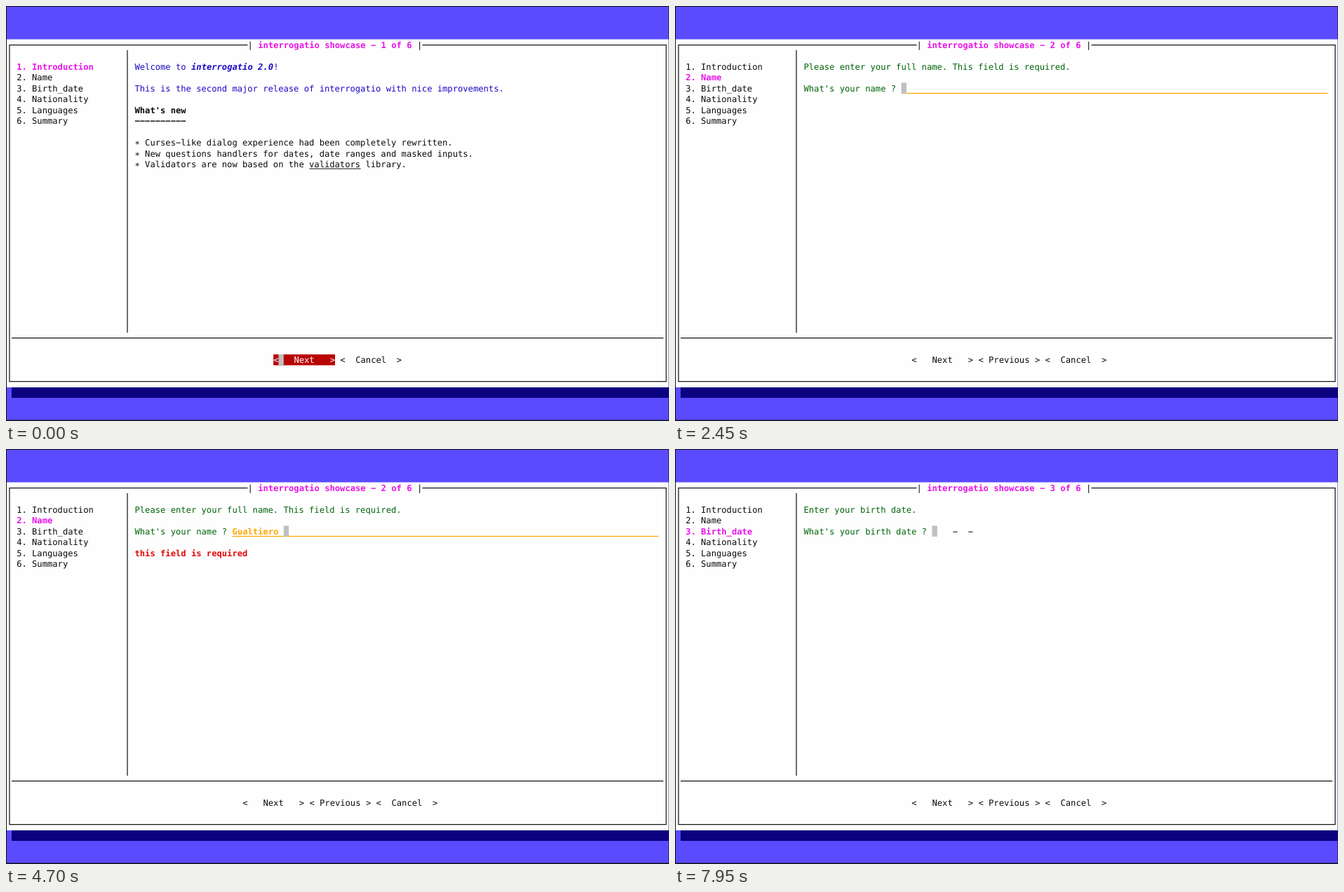
These frames come from a looping animation (945x592 px, 8000 ms). An HTML page:

```html
<!DOCTYPE html>
<html lang="en">
<head>
<meta charset="utf-8">
<title>Terminal dialog</title>
<style>
  html, body { margin: 0; width: 100%; height: 100%; overflow: hidden; background: #111; }
  svg { display: block; width: 100%; height: 100%; }
  text {
    font: 12.158px "DejaVu Sans Mono", monospace;
    white-space: pre;
    text-rendering: geometricPrecision;
    fill: #0a0a0a;
  }
  .b { font-weight: bold; }
  .i { font-style: italic; }
  .pink { fill: #e812e8; }
  .blue { fill: #1c08c4; }
  .green { fill: #00640a; }
  .red { fill: #e20808; }
  .orange { fill: #ffa500; }
  .white { fill: #fff; }
  .line { fill: none; stroke: #151515; stroke-width: 1.25; }
</style>
</head>
<body>
<svg id="screen" viewBox="0 0 945 592" preserveAspectRatio="none"></svg>
<script>
const LOOP = 8000, CW = 7.32, RH = 15.5;
const screen = document.getElementById('screen');
const steps = ['Introduction', 'Name', 'Birth_date', 'Nationality', 'Languages', 'Summary'];
const fullName = 'Gualtiero Bresina';
const dateKeys = [[0, ''], [6440, '2'], [6550, '20'], [7490, '202'], [7740, '20'], [7840, '2'], [7940, '']];

// Character grid to pixels
const X = col => 0.5 + col * CW;
const Y = row => 1 + row * RH;

const esc = s => s.replace(/</g, '&lt;').replace(/>/g, '&gt;');
const rect = (x, y, w, h, fill) =>
  `<rect x="${x}" y="${y}" width="${w}" height="${h}" fill="${fill}"/>`;
const put = (row, col, s, cls = '') =>
  `<text x="${X(col)}" y="${Y(row) + 12.3}" class="${cls}">${esc(s)}</text>`;
const fillCells = (row, col, n, fill) => rect(X(col), Y(row), n * CW, RH, fill);
const cursor = (row, col) => fillCells(row, col, 1, '#bfbfbf');
const path = d => `<path class="line" d="${d}"/>`;

const backdrop =
  rect(1, 1, 943.5, 589.5, '#5a4bff') +
  rect(8, 543.5, 936.5, 15.5, '#0b0080') +
  rect(1, 47.5, 943.5, 496.5, '#fefefe') +
  path('M344.5 55.5H5V535.5H941V55.5H593.4') +
  path('M173 63V466') +
  path('M8 473.7H937') +
  put(3, 47, '|') + put(3, 80, '|');

function button(col, label, pad, focused) {
  const cls = focused ? 'white' : '';
  return (focused ? fillCells(32, col, 12, '#b80404') + cursor(32, col + 1) : '') +
    put(32, col, '<', cls) + put(32, col + pad, label, cls) + put(32, col + 11, '>', cls);
}

function frameParts(page, nextFocused) {
  const start = page === 1 ? 52 : 46;
  let out = put(3, 49, `interrogatio showcase − ${page} of 6`, 'b pink');
  steps.forEach((name, i) => {
    out += put(5 + i, 2, `${i + 1}. ${name}`, i + 1 === page ? 'b pink' : '');
  });
  out += button(start, 'Next', 4, nextFocused);
  if (page > 1) out += button(start + 13, 'Previous', 2, false);
  return out + button(page === 1 ? 65 : 72, 'Cancel', 3, false);
}

function intro() {
  return put(5, 25, 'Welcome to ', 'blue') +
    put(5, 36, 'interrogatio 2.0', 'b i blue') +
    put(5, 52, '!', 'blue') +
    put(7, 25, 'This is the second major release of interrogatio with nice improvements.', 'blue') +
    put(9, 25, "What's new", 'b') +
    put(10, 25, '−'.repeat(10), 'b') +
    put(12, 25, '∗ Curses−like dialog experience had been completely rewritten.') +
    put(13, 25, '∗ New questions handlers for dates, date ranges and masked inputs.') +
    put(14, 25, '∗ Validators are now based on the validators library.') +
    rect(X(59), Y(14) + 13.6, 10 * CW, 1, '#0a0a0a');
}

function nameForm(typed, focused, error) {
  return put(5, 25, 'Please enter your full name. This field is required.', 'green') +
    put(7, 25, "What's your name ?", 'green') +
    rect(X(44), 123.9, 83 * CW, 1.3, '#ffa500') +
    (focused ? cursor(7, 44 + typed.length) : '') +
    put(7, 44, typed, 'b orange') +
    (error ? put(9, 25, 'this field is required', 'b red') : '');
}

function dateForm(typed) {
  return put(5, 25, 'Enter your birth date.', 'green') +
    put(7, 25, "What's your birth date ?", 'green') +
    put(7, 54, '−') + put(7, 57, '−') +
    cursor(7, 50 + typed.length) +
    put(7, 50, typed, 'b orange');
}

function view(t) {
  if (t < 2400) return frameParts(1, true) + intro();
  if (t < 5950) {
    const onNext = (t >= 2750 && t < 3600) || t >= 5550;
    const count = Math.max(0, Math.floor((t - 3780) / 100) + 1);
    return frameParts(2, onNext) + nameForm(fullName.slice(0, count), !onNext, t >= 3000);
  }
  const typed = dateKeys.filter(k => k[0] <= t).pop()[1];
  return frameParts(3, false) + dateForm(typed);
}

let shown = '';
const begin = performance.now();
function draw() {
  const markup = view((performance.now() - begin) % LOOP);
  if (markup !== shown) {
    screen.innerHTML = backdrop + markup;
    shown = markup;
  }
  requestAnimationFrame(draw);
}
draw();
</script>
</body>
</html>
```
